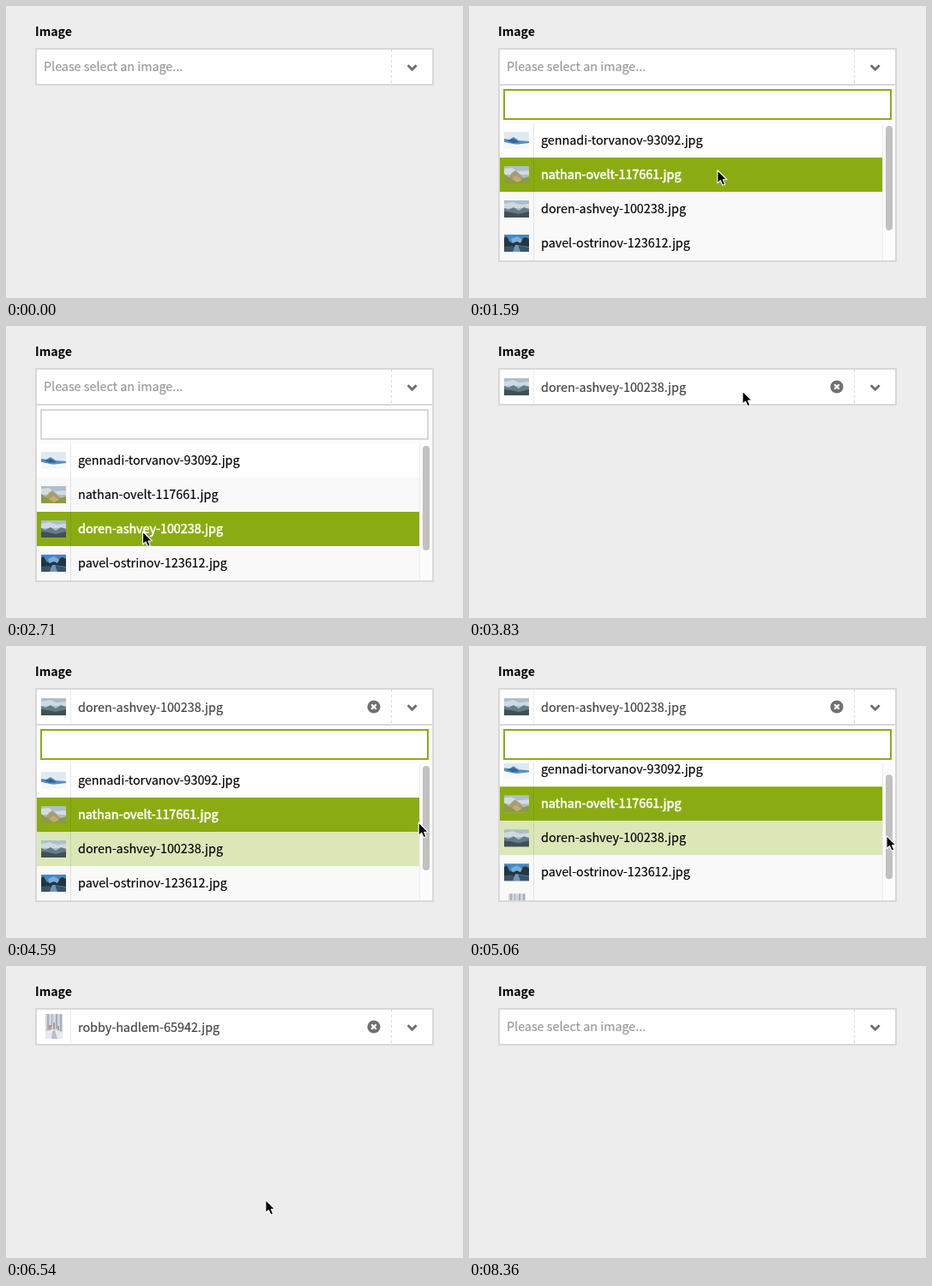
These frames come from a looping animation (533x341 px, 8460 ms). An HTML page:

```html
<!DOCTYPE html>
<html lang="en">
<head>
<meta charset="utf-8">
<title>Image select</title>
<style>
  html, body { margin: 0; width: 100%; height: 100%; overflow: hidden; background: #ededed; }
  svg { display: block; width: 100vw; height: 100vh; }
  text { font: 14.33px "Noto Sans CJK SC", "Noto Sans CJK JP", "Noto Sans", sans-serif; stroke-width: .2px; }
  .label { font-size: 14.1px; font-weight: 700; }
</style>
</head>
<body>
<svg viewBox="0 0 533 341" xmlns="http://www.w3.org/2000/svg">
  <defs>
    <clipPath id="list"><rect x="36" y="137" width="446" height="160"/></clipPath>
    <g id="thumb0">
      <path fill="#dfeaf3" d="M0 0h29v20H0z"/>
      <path fill="#5b8fbb" d="M0 8l6 1 5-3 6 4 12 1v3l-13 1L0 12z"/>
      <path fill="#2f6799" d="M3 10l8-2 7 4-8 1z"/>
      <path fill="#f4f8fb" d="M0 12l12 3 17-2v7H0z"/>
    </g>
    <g id="thumb1">
      <path fill="#a9bfce" d="M0 0h29v20H0z"/>
      <path fill="#d3dbde" d="M0 3l9-1 6 4 14-1v5H0z"/>
      <path fill="#a99d70" d="M3 16l6-8 4-3 5 4 7 8z"/>
      <path fill="#8b9a48" d="M0 9l7 5 9 2 13-4v8H0z"/>
      <path fill="#c0ae6c" d="M9 15l5-4 7 5-6 3z"/>
    </g>
    <g id="thumb2">
      <path fill="#aabfcd" d="M0 0h29v20H0z"/>
      <path fill="#d0d9de" d="M0 4l10-2 8 3 11-1v5H0z"/>
      <path fill="#667b87" d="M0 9l5 2 6-3 6 4 6-4 6 2v10H0z"/>
      <path fill="#3f5054" d="M0 13l8 1 9 2 12-3v7H0z"/>
    </g>
    <g id="thumb3">
      <path fill="#4488c4" d="M0 0h29v20H0z"/>
      <path fill="#78aeda" d="M8 5l7-3 6 4-2 5-9 0z"/>
      <path fill="#26353d" d="M0 4l3-2 3 6 4 2 5-2 4 2 3-6 3-1 4 2v9l-8-1-6-1-5 4-10 1z"/>
      <path fill="#39536a" d="M0 14l10-1 3 7H0zM17 13l12 2v5H17z"/>
      <path fill="#7097b7" d="M13 12h3l3 8h-9z"/>
    </g>
    <g id="thumb4">
      <path fill="#d3d5dd" d="M0 0h20v29H0z"/>
      <path fill="#a8adbd" d="M2 0h2v20H2zM7 0h1v15H7zM12 0h2v17h-2zM17 0h2v21h-2z"/>
      <path fill="#b39a87" d="M4 13h3v6H4zM9 10h2v8H9zM14 14h2v5h-2z"/>
      <path fill="#e8e9ee" d="M0 20l8-2 12 3v8H0z"/>
      <path fill="#b9bdcb" d="M8 20l3-1 3 10H7z"/>
    </g>
  </defs>
  <path fill="#ededed" d="M0 0h533v341H0z"/>
  <text class="label" x="34" y="35">Image</text>

  <g id="dropdown">
    <rect x="35" y="92" width="463" height="206" fill="#fcfcfc" stroke="#d8d8d8" stroke-width="2"/>
    <rect id="search" x="41" y="98" width="451" height="34" fill="#fff" stroke-width="2"/>
    <g clip-path="url(#list)"><g id="rows"></g></g>
    <path d="M482.5 137V297" stroke="#ebebeb"/>
    <rect id="bar" x="486" y="140" width="8" height="122" rx="4" fill="#c1c1c1"/>
  </g>

  <rect id="field" x="35" y="50" width="463" height="42" fill="#fff" stroke-width="2"/>
  <text id="placeholder" x="44" y="76" fill="#999" stroke="#999">Please select an image...</text>
  <g id="value">
    <use id="valueThumb"/>
    <path d="M75.5 51V91" stroke="#ececec"/>
    <text id="valueText" x="84" y="77" fill="#444" stroke="#444"></text>
    <circle cx="429" cy="71" r="7.6" fill="#707070"/>
    <path d="M426.2 68.2l5.6 5.6m0-5.6l-5.6 5.6" stroke="#fff" stroke-width="2.3"/>
  </g>
  <path d="M449.5 51V91" stroke="#d8d8d8" stroke-dasharray="3 3"/>
  <path d="M468.7 69.2l5 5 5-5" fill="none" stroke="#707070" stroke-width="3"/>

  <path id="cursor" d="M0 0V15.2L3.5 12 6 17.6 8.8 16.4 6.4 11H11z" fill="#000" stroke="#fff" stroke-width="1.1" stroke-linejoin="round"/>
</svg>
<script>
const LOOP = 8460, GREEN = '#8aac12', GREY = '#d8d8d8';
const $ = id => document.getElementById(id);
const files = ['gennadi-torvanov-93092', 'nathan-ovelt-117661', 'doren-ashvey-100238',
  'pavel-ostrinov-123612', 'robby-hadlem-65942'].map(name => name + '.jpg');

// Pointer stops: time, x, y
const stops = [
  [350, 470, 270], [780, 335, 80], [1240, 335, 80], [1590, 290, 191.5],
  [2060, 172, 279], [2200, 165, 283], [2470, 159.5, 240], [3000, 159.5, 240],
  [3830, 319, 76], [4000, 319, 76], [4590, 481, 206], [4760, 487, 211],
  [4940, 487, 211], [5220, 487, 244], [5600, 289.5, 269.5], [5780, 290, 271],
  [6420, 290, 271], [6540, 302.5, 273], [6660, 371, 257], [7250, 427, 66],
  [7430, 427, 66], [7610, 534, 252]
];

const within = (t, from, to) => t >= from && t < to;
const clamp = (v, lo, hi) => Math.min(hi, Math.max(lo, v));
const show = (id, on) => $(id).setAttribute('display', on ? 'inline' : 'none');
const set = (id, attrs) => Object.entries(attrs).forEach(([k, v]) => $(id).setAttribute(k, v));
const thumbAt = (i, top) => i === 4 ? `translate(46 ${top + 5})` : `translate(41 ${top + 10})`;

$('rows').innerHTML = files.map((file, i) => {
  const top = 137 + 40 * i;
  return `<rect id="row${i}" x="36" y="${top}" width="446" height="40"/>
    <use href="#thumb${i}" transform="${thumbAt(i, top)}"/>
    <path d="M75.5 ${top}v40" stroke="#000" stroke-opacity=".09"/>
    <text id="name${i}" x="84" y="${top + 25}">${file}</text>`;
}).join('');

// Tangents vanish where the pointer rests
function slope(i, axis) {
  const a = stops[i - 1], b = stops[i], c = stops[i + 1];
  if (!a || !c || (b[axis] - a[axis]) * (c[axis] - b[axis]) <= 0) return 0;
  return (c[axis] - a[axis]) / (c[0] - a[0]);
}

function pointer(t) {
  const i = clamp(stops.findIndex(s => s[0] > t) - 1, 0, stops.length - 2);
  const a = stops[i], b = stops[i + 1], span = b[0] - a[0];
  const u = clamp((t - a[0]) / span, 0, 1), v = 1 - u;
  return [1, 2].map(axis =>
    v * v * (1 + 2 * u) * a[axis] + u * u * (3 - 2 * u) * b[axis] +
    span * u * v * (v * slope(i, axis) - u * slope(i + 1, axis)));
}

function render(t) {
  const [x, y] = pointer(t);
  const chosen = within(t, 2820, 5900) ? 2 : within(t, 5900, 7430) ? 4 : -1;
  const open = within(t, 850, 2820) || within(t, 3940, 5900);
  const pressed = within(t, 2710, 2820) || within(t, 5840, 5900);
  const scroll = 40 * clamp((y - 211) / 33, 0, 1) * within(t, 4940, 5220) + 40 * (t >= 5220);

  let active = Math.max(chosen, 0);
  if (x > 481.5) active = 1;
  else if (y >= 137) active = clamp(Math.floor((y + scroll - 137) / 40), 0, 4);

  show('dropdown', open);
  if (open) {
    set('search', { stroke: pressed ? GREY : GREEN });
    set('rows', { transform: `translate(0 ${-scroll})` });
    set('bar', { y: 140 + scroll * .8 });
    files.forEach((_, i) => {
      const ink = i === active ? '#fff' : '#000';
      const back = i === active ? GREEN : i === chosen ? '#dce7b8' : i ? '#f9f9f9' : '#fefefe';
      set('row' + i, { fill: back });
      set('name' + i, { fill: ink, stroke: ink, 'stroke-width': 1 });
      $('name' + i).style.strokeWidth = i === active ? '.6px' : '.15px';
    });
  }

  set('field', { stroke: within(t, 7430, 8360) ? GREEN : GREY });
  show('placeholder', chosen < 0);
  show('value', chosen >= 0);
  if (chosen >= 0) {
    set('valueThumb', { href: '#thumb' + chosen, transform: thumbAt(chosen, 51) });
    $('valueText').textContent = files[chosen];
  }

  show('cursor', within(t, 350, 7610));
  set('cursor', { transform: `translate(${x} ${y})` });
}

const start = performance.now();
function tick() {
  render((performance.now() - start) % LOOP);
  requestAnimationFrame(tick);
}
tick();
</script>
</body>
</html>
```
